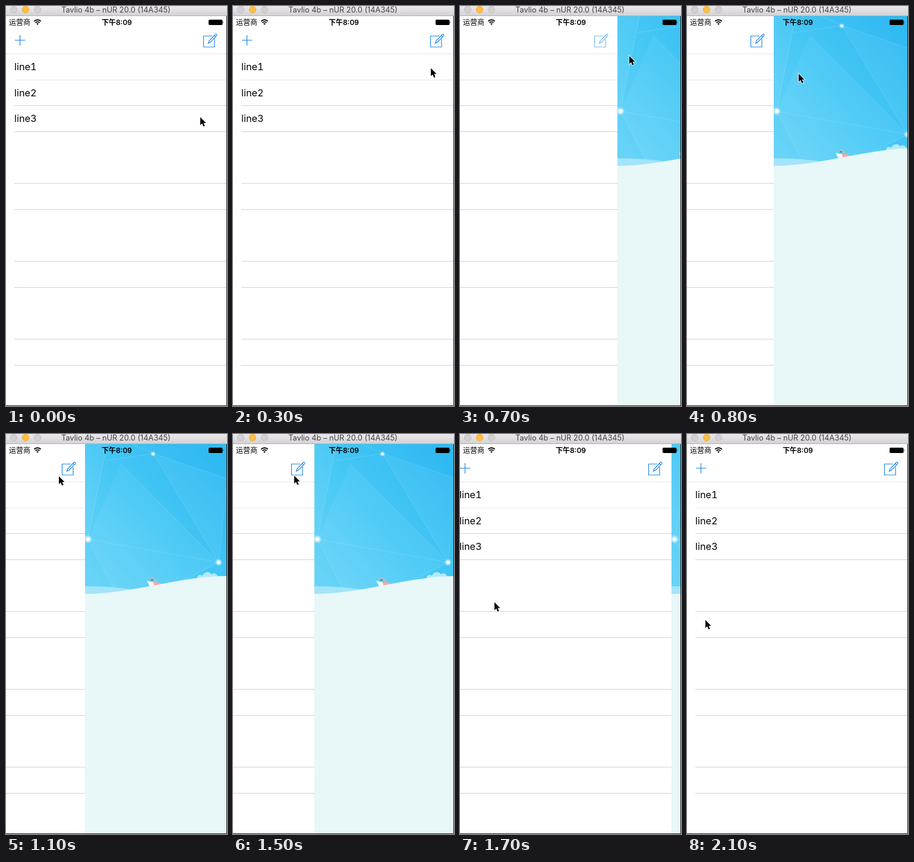
Write an HTML page that moves like this. It is 372x673 px and loops after 2.2 s.

```html
<!DOCTYPE html>
<html lang="zh">
<head>
<meta charset="utf-8">
<style>
html, body { margin: 0; width: 100%; height: 100%; overflow: hidden; background: #fff; }
svg { display: block; }
text { font-family: Inter, "Noto Sans CJK SC", "Noto Sans CJK", sans-serif; }
#rows text { font-size: 16.3px; font-variant-numeric: tabular-nums; }
</style>
</head>
<body>
<svg width="372" height="673" viewBox="0 0 372 673">
  <defs>
    <linearGradient id="bar" x2="0" y2="1">
      <stop stop-color="#ebe9eb"/><stop offset="1" stop-color="#d2d0d2"/>
    </linearGradient>
    <linearGradient id="sky" gradientUnits="userSpaceOnUse" x1="10" y1="230" x2="225" y2="40">
      <stop stop-color="#66d3f7"/><stop offset=".45" stop-color="#47c8f5"/><stop offset="1" stop-color="#2fb9f2"/>
    </linearGradient>
    <clipPath id="screen"><path d="M0 17H371V672H0Z"/></clipPath>
    <clipPath id="air"><path d="M0 0H240V269H0Z"/></clipPath>
  </defs>
  <rect width="372" height="673" fill="#fff"/>

  <g clip-path="url(#screen)">
    <g id="pages">
      <path d="M0 80.5H371" stroke="#e6e6e6"/>
      <g id="rows"></g>
      <path d="M15 57.5H32.5M23.5 49V66.5" stroke="#1f86dd" stroke-width="1.2"/>
      <g id="edit" fill="none" stroke="#2188e6" stroke-width="1.2">
        <path d="M347 50.5H332.5V69H351V55.5"/>
        <path d="M340.5 62.5L341.8 58.8L352.2 48Q353.3 46.6 354.6 47.8Q355.6 49 354.4 50.2L344 60.9ZM350.6 49.6L352.8 51.8"/>
      </g>

      <g transform="translate(371)">
        <rect width="240" height="673" fill="#e8f7f8"/>
        <g clip-path="url(#air)">
          <rect width="240" height="270" fill="url(#sky)"/>
          <g fill="#fff" fill-opacity=".05">
            <path d="M5 177L37 17H0V177Z"/>
            <path d="M5 177L225 216L60 50Z"/>
            <path d="M5 177L53 270H135L225 216Z"/>
            <path d="M115 33L225 216L238 75Z"/>
          </g>
          <path d="M37 17L5 177L225 216L115 33L238 75M5 177L53 270M225 216L130 262M225 216L238 90M115 33L80 17M115 33L33 45M60 50L225 216" fill="none" stroke="#fff" stroke-opacity=".15"/>
          <g id="nodes" fill="#fff"></g>
          <path d="M0 256Q45 256 82 262V270H0Z" fill="#a3e4fa"/>
          <g fill="#b4e9fb">
            <circle cx="194" cy="242" r="5"/><circle cx="206" cy="241" r="8.5"/><circle cx="217" cy="241" r="6.5"/>
          </g>
          <path d="M104 247L117 250L124 258H110Z" fill="#f3fafd"/>
          <path d="M115 250Q123 247 131 254L126 259H117Z" fill="#f2aaa0"/>
          <path d="M109 244Q116 239 119 247V250" fill="none" stroke="#c9b5b4" stroke-width="2"/>
          <path d="M111 245.5H115" stroke="#55626c" stroke-width="1.5"/>
        </g>
        <path d="M0 269C80 269 160 239 238 239H240V673H0Z" fill="#e8f7f8"/>
      </g>
    </g>

    <text x="5" y="32" font-size="12">运营商</text>
    <g fill="none" stroke="#000" stroke-width="1.8">
      <path d="M47.2 25.6Q53 20.8 58.8 25.6M49.4 28Q53 25.2 56.6 28"/>
      <path d="M53 31.8L51 29.8Q53 28.4 55 29.8Z" fill="#000" stroke="none"/>
    </g>
    <text x="186.5" y="32" font-size="12" font-weight="600" text-anchor="middle">下午8:09</text>
    <rect x="341" y="23" width="23.5" height="9" rx="1.8"/>
    <path d="M365.2 25.7Q366.8 27.5 365.2 29.3Z"/>
  </g>

  <rect width="372" height="17" fill="url(#bar)"/>
  <path d="M0 16.5H372" stroke="#b3b1b3"/>
  <g fill="#d2d0d2" stroke="#bdbbbd" stroke-width=".8">
    <circle cx="13" cy="6" r="5.7"/>
    <circle cx="33" cy="6" r="5.7" fill="#fdbe41" stroke="#e5a93a"/>
    <circle cx="53" cy="6" r="5.7"/>
  </g>
  <text x="185" y="11.3" font-size="12.8" fill="#454345" text-anchor="middle">Tavlio 4b – nUR 20.0 (14A345)</text>
  <path d="M371.5 17V672.5H0" fill="none" stroke="#222"/>

  <g id="cursor">
    <path d="M0 0V13.4L3.1 10.6L5.3 15.8L7.7 14.8L5.5 9.7H9.6Z" stroke="#fff" stroke-width="1.6" paint-order="stroke"/>
  </g>
</svg>
<script>
const $ = id => document.getElementById(id);
const LOOP = 2200, STEP = 100, OPEN = 238, SLIDE = 275;

$('rows').innerHTML =
  [124, 167, 211, 298, 342, 429, 473, 560, 604].map((y, i) =>
    `<path d="M14 ${y + .5}H371" stroke="${i ? '#d2d2d4' : '#e6e6e8'}"/>`).join('') +
  [1, 2, 3].map(n => `<text x="14" y="${64.4 + 43.6 * n}">line${n}</text>`).join('');

$('nodes').innerHTML = [[5, 177, 3.6], [225, 216, 3.1], [114.5, 33.5, 2.2]].map(([x, y, r]) =>
  `<circle cx="${x}" cy="${y}" r="${r * 1.8}" opacity=".35"/><circle cx="${x}" cy="${y}" r="${r}"/>`).join('');

// time, x, y
const path = [
  [0, 327, 187], [100, 327, 180], [400, 336, 67], [600, 335, 65], [700, 285, 84],
  [800, 188, 114], [900, 125, 95], [1000, 95, 76], [1100, 89, 71], [1300, 102, 71],
  [1500, 103, 70], [1600, 85, 180], [1700, 58, 283], [1800, 42, 302], [1900, 34, 310], [2100, 31, 313]
];

function cursorAt(t) {
  const i = Math.max(1, path.findIndex(p => p[0] >= t));
  const [t0, x0, y0] = path[i - 1], [t1, x1, y1] = path[i];
  const k = (t - t0) / (t1 - t0);
  return [x0 + (x1 - x0) * k, y0 + (y1 - y0) * k];
}

// cubic-bezier(.42, 0, .58, 1)
function ease(p) {
  if (p <= 0) return 0;
  if (p >= 1) return 1;
  let lo = 0, hi = 1, u = .5;
  for (let i = 0; i < 20; i++) {
    u = (lo + hi) / 2;
    if (3 * u * (1 - u) * (.42 * (1 - u) + .58 * u) + u ** 3 < p) lo = u; else hi = u;
  }
  return u * u * (3 - 2 * u);
}

function draw(now) {
  const t = Math.floor(now % LOOP / STEP) * STEP;
  const open = ease((t - 571) / SLIDE) - ease((t - 1474) / SLIDE);
  $('pages').setAttribute('transform', `translate(${-Math.round(OPEN * open)})`);
  $('edit').setAttribute('opacity', t === 500 || t === 600 ? .25 : t === 700 ? .6 : 1);
  $('cursor').setAttribute('transform', `translate(${cursorAt(t)})`);
}

const start = performance.now();
function tick() {
  draw(performance.now() - start);
  requestAnimationFrame(tick);
}
tick();
</script>
</body>
</html>
```
